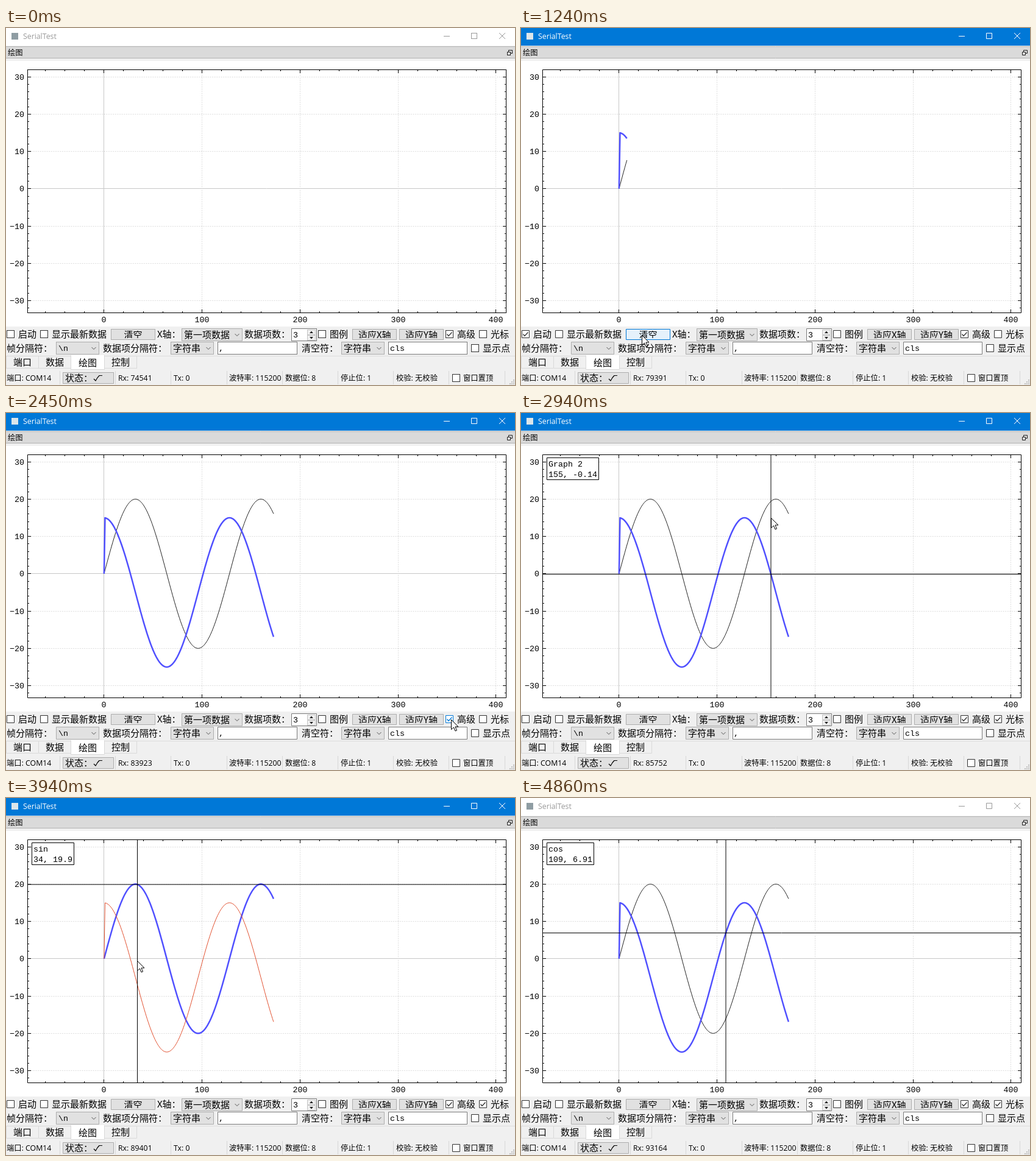
Write an HTML page with a canvas that moves like this. It is 835 px wide and 586 px high and loops after 4880 ms.

```html
<!DOCTYPE html>
<html lang="zh">
<head>
<meta charset="utf-8">
<title>SerialTest</title>
<style>
html, body { margin: 0; width: 100%; height: 100%; overflow: hidden; background: #f0f0f0; }
canvas { display: block; }
</style>
</head>
<body>
<canvas id="stage" width="835" height="586"></canvas>
<script>
const ctx = document.getElementById('stage').getContext('2d');
const LOOP = 4880;
const UI = "15px 'Noto Sans CJK SC', 'Noto Sans CJK', sans-serif";
const SMALL = "12.3px 'Open Sans', 'Noto Sans CJK SC', 'Noto Sans CJK', sans-serif";
const MONO = "13.33px 'Liberation Mono', monospace";
const BLUE = '#0078d7';
const PLOT = { left: 35, top: 68, right: 820, bottom: 467 };
const STOP = 173;
const START_AT = 290, CLEAR_AT = 900, STOP_AT = 1939, CURSOR_ON = 2710;
const SIN_PICKED = 3160, COS_PICKED = 4370, BLUR_AT = 4830;

// time, x, y
const mousePath = [
  [140, -14, 520], [250, 20, 505], [560, 20, 505], [700, 198, 504], [1600, 198, 504],
  [1740, 23, 503], [1960, 23, 503], [2140, 545, 505], [2250, 545, 505], [2540, 784, 503],
  [2730, 784, 503], [2940, 410, 172], [3110, 378, 222], [3200, 378, 222], [3480, 339, 246],
  [3940, 215, 267], [4320, 336, 222], [4830, 336, 222]
];
const received = [[0, 74537], [740, 77508], [1820, 81568], [2940, 85748],
  [3480, 87789], [3940, 89397], [4860, 93164]];

const px = v => 160.85 + v * 1.6074;
const py = v => 263.85 - v * 6.125;
const sinAt = k => 20 * Math.sin(k * Math.PI / 64);
const cosAt = k => k ? 20 * Math.cos(k * Math.PI / 64) - 5 : 0;
const smooth = u => u * u * (3 - 2 * u);

function keyed(keys, t, ease = u => u) {
  if (t <= keys[0][0]) return keys[0].slice(1);
  for (let i = 1; i < keys.length; i++) {
    const a = keys[i - 1], b = keys[i];
    if (t <= b[0]) {
      const u = ease((t - a[0]) / (b[0] - a[0]));
      return a.slice(1).map((v, j) => v + (b[j + 1] - v) * u);
    }
  }
  return keys[keys.length - 1].slice(1);
}

let mouse = { x: -99, y: -99 };
const over = (x, y, w, h) =>
  mouse.x >= x && mouse.x < x + w && mouse.y >= y && mouse.y < y + h;

function fill(x, y, w, h, color) {
  ctx.fillStyle = color;
  ctx.fillRect(x, y, w, h);
}

function box(x, y, w, h, back, border) {
  fill(x, y, w, h, back);
  ctx.strokeStyle = border;
  ctx.lineWidth = 1;
  ctx.strokeRect(x + 0.5, y + 0.5, w - 1, h - 1);
}

function line(points, color, width = 1) {
  ctx.strokeStyle = color;
  ctx.lineWidth = width;
  ctx.beginPath();
  points.forEach(([x, y]) => ctx.lineTo(x, y));
  ctx.stroke();
}

function text(s, x, y, font = UI, color = '#000', align = 'left') {
  ctx.font = font;
  ctx.fillStyle = color;
  ctx.textAlign = align;
  ctx.fillText(s, x, y);
}

function check(x, y, label, labelWidth, on, font = UI, baseline = y + 12) {
  const color = over(x, y - 3, 19 + labelWidth, 20) ? BLUE : '#333';
  box(x, y, 13, 13, '#fff', color);
  if (on) line([[x + 2.5, y + 6.5], [x + 5, y + 9.5], [x + 10.5, y + 3.5]], color, 1.3);
  text(label, x + (font === UI ? 19 : 18), baseline, font);
}

function button(x, y, w, h, label, textX) {
  const hot = over(x, y, w, h);
  box(x, y, w, h, hot ? '#e5f1fb' : '#e1e1e1', hot ? BLUE : '#adadad');
  ctx.save();
  ctx.beginPath();
  ctx.rect(x, y + 3, w, h - 6);
  ctx.clip();
  text(label, textX, y + 15);
  ctx.restore();
}

function combo(x, y, w, label, font = UI) {
  const hot = over(x, y, w, 21);
  box(x, y, w, 21, hot ? '#e5f1fb' : '#e1e1e1', hot ? BLUE : '#adadad');
  text(label, x + 4, y + (font === UI ? 16 : 15), font);
  const ax = x + w - 9, ay = y + 9;
  line([[ax - 3.5, ay], [ax, ay + 3.5], [ax + 3.5, ay]], '#555');
}

function titleBar(active) {
  const ink = active ? '#fff' : '#999';
  fill(0, 0, 835, 29, active ? BLUE : '#fff');
  fill(9, 8, 11, 11, active ? '#dce6ea' : '#8f9da3');
  text('SerialTest', 28, 18, SMALL, ink);
  line([[718, 13.5], [728, 13.5]], ink);
  ctx.strokeRect(763.5, 8.5, 9, 9);
  line([[809, 8], [819, 18]], ink);
  line([[819, 8], [809, 18]], ink);

  box(-1, 30, 837, 20, '#dadada', '#b4b4b4');
  text('绘图', 3, 45, SMALL);
  box(824, 36, 7, 6, '#dadada', '#222');
  box(822, 39, 6, 6, '#dadada', '#222');
}

function axes() {
  fill(0, 54, 835, 436, '#fff');
  const { left, top, right, bottom } = PLOT;
  const grid = (v, points) => {
    ctx.setLineDash(v ? [1, 2] : []);
    line(points, '#c8c8c8');
    ctx.setLineDash([]);
  };
  for (let v = -60; v <= 400; v += 20) {
    const x = Math.floor(px(v)) + 0.5, major = v % 100 === 0, len = major ? 6 : 3;
    if (major) {
      grid(v, [[x, top], [x, bottom]]);
      text(v, x, 483, MONO, '#000', 'center');
    }
    line([[x, bottom], [x, bottom - len + 1]], '#000');
    line([[x, top], [x, top + len]], '#000');
  }
  for (let v = -32; v <= 30; v += 2) {
    const y = Math.floor(py(v)) + 0.5, major = v % 10 === 0, len = major ? 6 : 3;
    if (major) {
      grid(v, [[left, y], [right, y]]);
      text(String(v).replace('-', '−'), 30, y + 4.5, MONO, '#000', 'right');
    }
    line([[left, y], [left + len, y]], '#000');
    line([[right, y], [right - len + 1, y]], '#000');
  }
}

// Keys shown at time t: the device counts 0..255, then sends a clear command.
function visibleKeys(t) {
  if (t < START_AT) return null;
  const total = 147 + (Math.min(t, STOP_AT) - 740) * 0.2352;
  if (total >= 256) return [0, Math.min(STOP, Math.floor(total - 256))];
  const cleared = Math.ceil(147 + (CLEAR_AT - 740) * 0.2352);
  return [t < CLEAR_AT ? 43 : cleared, Math.floor(total)];
}

function curve(fn, [from, to], color, selected) {
  const points = [];
  // The first line received lost its leading digit, so 43 is read as 3.
  for (let k = from; k <= to; k++) points.push([px(k === 43 && from === 43 ? 3 : k), py(fn(k))]);
  ctx.lineJoin = 'round';
  line(points, selected ? '#5050ff' : color, selected ? 2.5 : 1);
}

function crosshair(t, sinSelected) {
  const key = Math.max(0, Math.min(STOP, Math.round((mouse.x - 160.85) / 1.6074)));
  const value = (sinSelected ? sinAt : cosAt)(key);
  const { left, top, right, bottom } = PLOT;
  line([[px(key), top], [px(key), bottom]], '#000');
  line([[left, py(value)], [right, py(value)]], '#000');
  const name = sinSelected ? 'sin' : t < SIN_PICKED ? 'Graph 2' : 'cos';
  const reading = `${key}, ${+value.toFixed(2)}`;
  box(42, 73, Math.max(name.length, reading.length) * 8 + 6, 37, '#fff', '#000');
  text(name, 45, 88, MONO);
  text(reading, 45, 105, MONO);
}

function controls(t) {
  check(1, 496, '启动', 30, t >= START_AT && t < STOP_AT);
  check(56, 496, '显示最新数据', 90, false);
  button(172, 494, 73, 18, '清空', 193.5);
  text('X轴：', 248, 508);
  combo(288, 493, 100, '第一项数据');
  text('数据项数：', 391, 508);
  box(468, 493, 42, 21, '#fff', '#7a7a7a');
  text('3', 471, 508, MONO);
  for (const [y, dir] of [[495, -1], [504, 1]]) {
    box(494, y, 14, 9, '#f0f0f0', '#c4c4c4');
    ctx.fillStyle = '#222';
    ctx.beginPath();
    ctx.moveTo(498, y + 4.5 - dir * 1.5);
    ctx.lineTo(504, y + 4.5 - dir * 1.5);
    ctx.lineTo(501, y + 4.5 + dir * 2);
    ctx.fill();
  }
  check(512, 496, '图例', 30, false);
  button(568, 494, 73, 18, '适应X轴', 578);
  button(645, 494, 73, 18, '适应Y轴', 655);
  check(721, 496, '高级', 30, true);
  check(776, 496, '光标', 30, t >= CURSOR_ON);

  text('帧分隔符：', 1, 531);
  combo(82, 515, 71, '\\n', MONO);
  text('数据项分隔符：', 159, 531);
  combo(270, 515, 71, '字符串');
  box(347, 515, 131, 21, '#fff', '#7a7a7a');
  text(',', 349, 530, MONO);
  text('清空符：', 485, 531);
  combo(550, 515, 71, '字符串');
  box(627, 515, 130, 21, '#fff', '#7a7a7a');
  text('cls', 630, 530, MONO);
  check(763, 519, '显示点', 45, false);
}

function tabs() {
  fill(0, 538, 835, 1, '#dcdcdc');
  [['端口', 0, 54], ['数据', 53, 54], ['控制', 161, 54]].forEach(([label, x, w]) => {
    box(x, 538, w, 21, '#f0f0f0', '#d9d9d9');
    text(label, x + 12, 554);
  });
  box(106, 537, 56, 24, '#fff', '#d9d9d9');
  fill(107, 537, 54, 2, '#fff');
  text('绘图', 119, 555);
}

function statusBar(rx) {
  for (let i = 0; i < 9; i++) fill(Math.round(88 + i * 91.2), 563, 1, 22, '#d7d7d7');
  text('端口: COM14', 1, 579, SMALL);
  box(93, 565, 84, 19, '#e1e1e1', '#adadad');
  text('状态：', 97, 580);
  line([[144, 576], [147, 579], [150, 574], [153, 570.5], [158, 570.5]], '#000', 1.2);
  text('Rx: ' + rx, 184, 579, SMALL);
  text('Tx: 0', 275, 579, SMALL);
  text('波特率: 115200', 366, 579, SMALL);
  text('数据位: 8', 458, 579, SMALL);
  text('停止位: 1', 549, 579, SMALL);
  text('校验: 无校验', 640, 579, SMALL);
  check(732, 568, '窗口置顶', 48, false, SMALL, 579);
  for (let row = 0; row < 3; row++)
    for (let col = 0; col <= row; col++) fill(832 - col * 3, 577 + row * 3, 2, 2, '#bfbfbf');
}

function pointer() {
  ctx.save();
  ctx.translate(Math.round(mouse.x) + 0.5, Math.round(mouse.y) + 0.5);
  ctx.beginPath();
  [[0, 0], [0, 16], [4, 12.5], [6.5, 18.5], [9, 17.5], [6.5, 11.5], [11.5, 11.5]]
    .forEach(([x, y]) => ctx.lineTo(x, y));
  ctx.closePath();
  ctx.fillStyle = '#fff';
  ctx.fill();
  ctx.strokeStyle = '#000';
  ctx.lineWidth = 1;
  ctx.stroke();
  ctx.restore();
}

function draw(t) {
  const [x, y] = keyed(mousePath, t, smooth);
  mouse = { x, y };
  fill(0, 0, 835, 586, '#f0f0f0');
  titleBar(t >= START_AT && t < BLUR_AT);
  axes();
  const keys = visibleKeys(t);
  const sinSelected = t >= SIN_PICKED && t < COS_PICKED;
  if (keys) {
    curve(sinAt, keys, '#222', sinSelected);
    curve(cosAt, keys, '#e2502f', !sinSelected);
  }
  if (t >= CURSOR_ON) crosshair(t, sinSelected);
  const { left, top, right, bottom } = PLOT;
  ctx.strokeStyle = '#000';
  ctx.lineWidth = 1;
  ctx.strokeRect(left + 0.5, top + 0.5, right - left, bottom - top);
  controls(t);
  tabs();
  statusBar(Math.round(keyed(received, t)[0]));
  if (t < BLUR_AT) pointer();
}

const begin = performance.now();
function tick() {
  draw((performance.now() - begin) % LOOP);
  requestAnimationFrame(tick);
}
tick();
</script>
</body>
</html>
```
